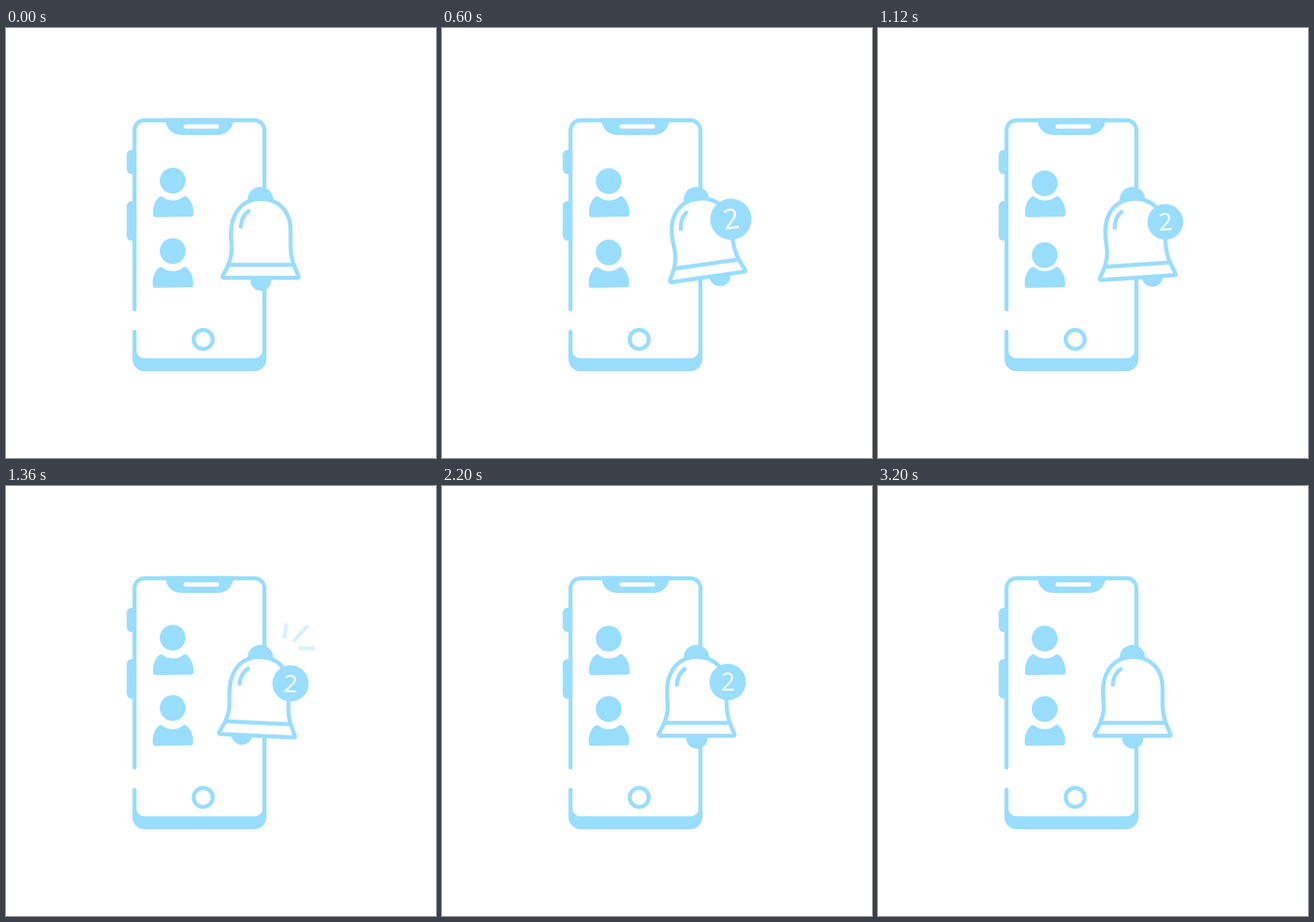
Recreate the animation shown at these times as an HTML page without scripts. Size 748 px wide and 748 px high, loop 3.24 s.

```html
<!DOCTYPE html>
<html lang="en">
<head>
<meta charset="utf-8">
<title>Phone notification</title>
<style>
html, body { margin: 0; width: 100%; height: 100%; overflow: hidden; background: #fff; }
svg { display: block; width: 100vw; height: 100vh; }
.fill { fill: #9df; }
.line { fill: none; stroke: #9df; stroke-width: 7; stroke-linecap: round; stroke-linejoin: round; }
.paper { fill: #fff; }
.num { font: 400 43px "Open Sans", "Noto Sans", sans-serif; fill: #fff; text-anchor: middle; }
.move { animation: 3240ms cubic-bezier(.37, 0, .63, 1) infinite; }
.bell { animation-name: bell; transform-origin: 442.5px 298px; }
.clapper { animation-name: clapper; transform-origin: 443.3px 368.5px; }
.badge { animation-name: badge; transform-origin: 497px 341px; }
.rays { animation-name: rays; animation-timing-function: linear; }
.head1 { animation-name: head1; }
.head2 { animation-name: head2; }

@keyframes bell {
  0%, 65.43%, 100% { transform: rotate(0deg); }
  4.32% { transform: rotate(-5deg); }
  11.57% { transform: rotate(10deg); }
  17.28% { transform: rotate(-9.4deg); }
  24.69% { transform: rotate(8deg); }
  32.1% { transform: rotate(-6.8deg); }
  39.51% { transform: rotate(5deg); }
  46.91% { transform: rotate(-4.3deg); }
  54.32% { transform: rotate(3deg); }
  60.49% { transform: rotate(-1.5deg); }
}
@keyframes clapper {
  0%, 64.2%, 100% { transform: rotate(0deg); }
  5.56% { transform: rotate(-14deg); }
  12.35% { transform: rotate(21.4deg); }
  19.75% { transform: rotate(-20deg); }
  27.16% { transform: rotate(21deg); }
  34.57% { transform: rotate(-21deg); }
  41.98% { transform: rotate(22.7deg); }
  49.38% { transform: rotate(-15deg); }
  56.79% { transform: rotate(8deg); }
}
@keyframes badge {
  0%, 2.47%, 98.77%, 100% { transform: scale(0); }
  11.73% { transform: scale(1.27); }
  26.23% { transform: scale(.965); }
  33.95% { transform: scale(.98); }
  46.3%, 92.59% { transform: scale(1); }
}
@keyframes rays {
  0%, 7.41%, 17.28%, 23.46%, 32.1%, 40.12%, 50.62%, 54.94%, 64.81%, 100% { opacity: 0; }
  10.49%, 12.96%, 27.16%, 45.37%, 59.26% { opacity: 1; }
}
@keyframes head1 {
  0%, 49.38%, 100% { transform: translateY(0); }
  8.95% { transform: translateY(11.6px); }
  19.14% { transform: translateY(.8px); }
  27.16% { transform: translateY(12px); }
  41.36% { transform: translateY(-1.6px); }
}
@keyframes head2 {
  0%, 50.62%, 100% { transform: translateY(0); }
  11.42% { transform: translateY(14.3px); }
  20.06% { transform: translateY(1.5px); }
  28.4% { transform: translateY(13px); }
  42.59% { transform: translateY(-2px); }
}
</style>
</head>
<body>
<svg viewBox="0 0 748 748">
  <defs>
    <path id="body" d="M268 293Q271 292 273.500 294.500Q281 300 290.500 300Q301 300 308 294Q312 291 315 294C323 302 327 313 326 324Q326 327.700 322.500 328L260 329Q256.500 329 256 325C254.500 313 259 299 268 293Z"/>
  </defs>

  <!-- phone -->
  <g class="fill">
    <path d="M223 212H219Q210 212 210 222V244Q210 254 219 254H223Z"/>
    <path d="M223 301H219Q210 301 210 311V360Q210 370 219 370H223Z"/>
    <path d="M277 156.500H396C396 174 384 186 368 186H305C289 186 277 174 277 156.500Z"/>
    <path d="M220 545V576A21 21 0 0 0 241 597H432A21 21 0 0 0 453 576V545H446V561A13.500 13.500 0 0 1 432.500 574.500H240.500A13.500 13.500 0 0 1 227 561V545Z"/>
  </g>
  <path class="line" d="M223.500 489.500V178A17.500 17.500 0 0 1 241 160.500H432A17.500 17.500 0 0 1 449.500 178V560M223.500 528.500V560"/>
  <rect class="paper" x="309" y="167.500" width="61.500" height="7.500" rx="3.700"/>
  <circle class="line" cx="343" cy="541.700" r="16.500"/>

  <!-- contacts -->
  <g class="fill">
    <use href="#body"/>
    <use href="#body" x="-.5" y="123"/>
    <circle class="move head1" cx="290" cy="265.500" r="22.500"/>
    <circle class="move head2" cx="290" cy="388" r="22.500"/>
  </g>

  <g class="move rays line">
    <path d="M487.500 242L484 263M523 245L501.500 268.500M512 282.500H534.500"/>
  </g>

  <g class="move bell">
    <circle class="fill" cx="442.500" cy="298.500" r="22.300"/>
    <circle class="fill move clapper" cx="443.300" cy="438.500" r="18.500"/>
    <path class="line" style="fill:#fff" d="M443 297.500C411 297.500 391.500 322 391.500 358C391.500 374 393.500 382 392 393C390.500 403 387 412 383 420L377 431Q376 434.500 379 434.500H507Q510 434.500 508.500 431L501 413C497 402 495 392 495 378V350C494 318 474 297.500 443 297.500Z"/>
    <path class="line" d="M388 412H499M408.500 345.500Q409.500 328 422 318.500"/>
    <g class="move badge">
      <circle class="fill" cx="497" cy="341" r="31.700"/>
      <text class="num" x="497.500" y="356">2</text>
    </g>
  </g>
</svg>
</body>
</html>
```
